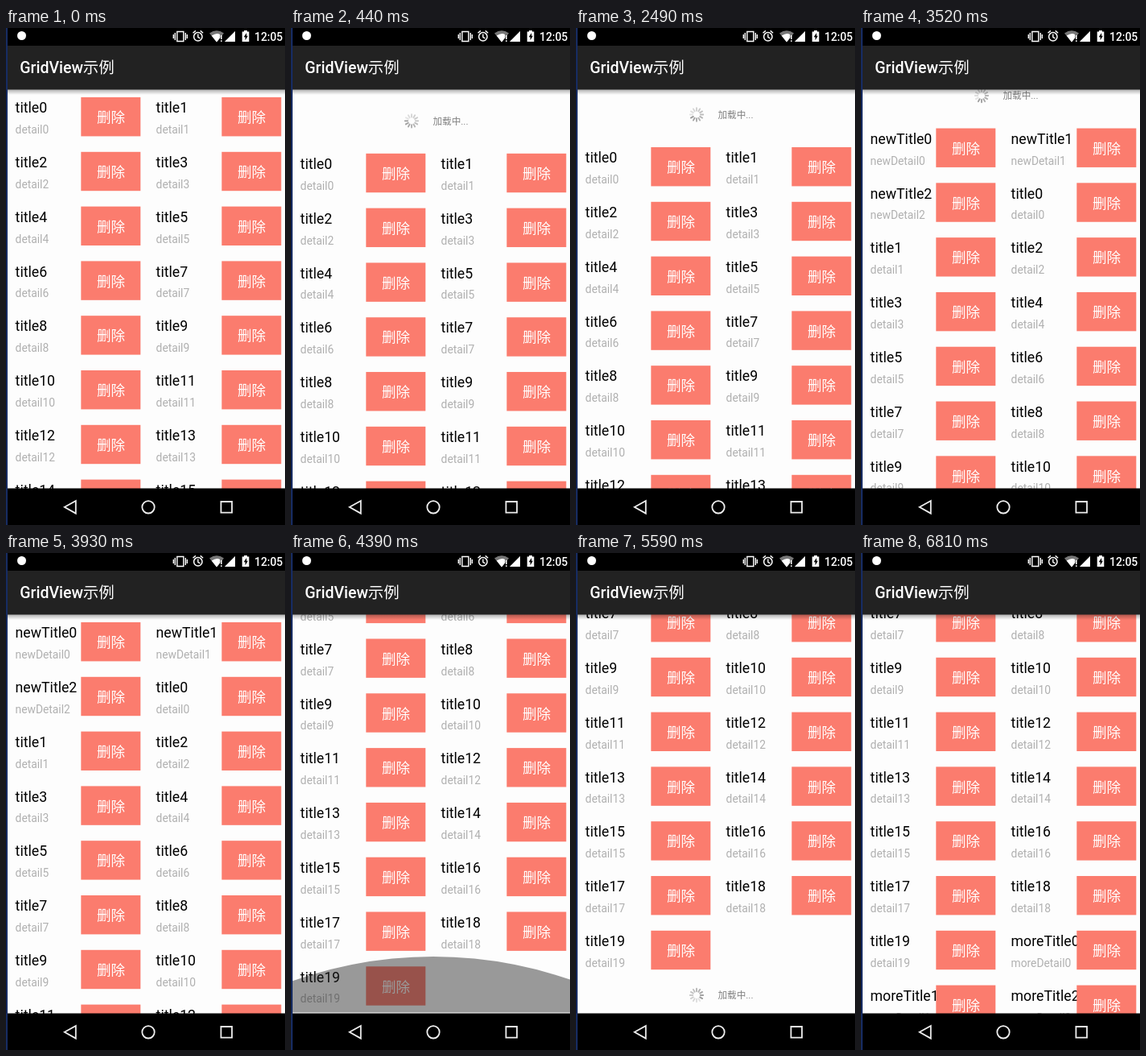
Write an HTML page with a canvas that moves like this. It is 347 px wide and 617 px high and loops after 7.2 s.

```html
<!DOCTYPE html>
<html lang="zh-CN">
<head>
<meta charset="utf-8">
<title>GridView</title>
<style>
html, body { margin: 0; width: 100%; height: 100%; overflow: hidden; background: #000; }
canvas { display: block; }
</style>
</head>
<body>
<canvas id="stage" width="347" height="617"></canvas>
<script>
const ctx = document.getElementById('stage').getContext('2d');
const LOOP = 7200, ROW = 67.8, COL = 175;
const RELEASED = 1420, REFRESHED = 3430, LOADED = 6600;
const FAMILY = 'Roboto, "Noto Sans CJK SC", "Noto Sans CJK", sans-serif';

const series = (n, name) => Array.from({ length: n }, (_, i) => name + i);
const base = series(20, 'title');
const fresh = [...series(3, 'newTitle'), ...base];
const full = [...fresh, ...series(3, 'moreTitle')];

const clamp = x => Math.min(1, Math.max(0, x));
const easeOut = x => 1 - (1 - x) ** 2;
const easeBoth = x => x * x * (3 - 2 * x);

// start, end, scroll position reached, easing
const moves = [
  [110, 700, -86.5, easeOut],
  [RELEASED, 1820, -62, easeOut],
  [REFRESHED, 3860, 0, easeOut],
  [4050, 4290, 318.5, easeBoth],
  [4560, 4860, 363, easeOut]
];

function scrollAt(t) {
  let pos = 0;
  for (const [start, end, to, ease] of moves)
    pos += (to - pos) * ease(clamp((t - start) / (end - start)));
  return pos;
}

function rect(x, y, w, h, color) {
  ctx.fillStyle = color;
  ctx.fillRect(x, y, w, h);
}

function text(str, x, y, size, color, weight = 400, align = 'left') {
  ctx.font = `${weight} ${size}px ${FAMILY}`;
  ctx.textAlign = align;
  ctx.fillStyle = color;
  ctx.fillText(str, x, y);
}

function shape(path, color, width) {
  const p = new Path2D(path);
  ctx.fillStyle = ctx.strokeStyle = color;
  ctx.lineWidth = width || 1;
  if (width) ctx.stroke(p); else ctx.fill(p);
}

function circle(x, y, r, color, width) {
  ctx.beginPath();
  ctx.arc(x, y, r, 0, 7);
  ctx.fillStyle = ctx.strokeStyle = color;
  ctx.lineWidth = width || 1;
  if (width) ctx.stroke(); else ctx.fill();
}

function loader(y, t) {
  const step = Math.floor(Math.max(0, t - RELEASED) / 95);
  ctx.lineWidth = 1.9;
  ctx.lineCap = 'round';
  for (let i = 0; i < 12; i++) {
    const a = (i + step + 7) * Math.PI / 6;
    const c = Math.cos(a), s = Math.sin(a);
    ctx.strokeStyle = `rgba(110,110,110,${0.18 + 0.045 * i})`;
    ctx.beginPath();
    ctx.moveTo(150 + c * 4.8, y + s * 4.8);
    ctx.lineTo(150 + c * 8.2, y + s * 8.2);
    ctx.stroke();
  }
  ctx.lineCap = 'butt';
  text('加载中...', 176.5, y + 4.4, 11.6, '#808080');
}

function cell(title, i, scroll) {
  const x = 2 + (i % 2) * COL;
  const y = Math.floor(i / 2) * ROW - scroll;
  if (y < -70 || y > 500) return;
  const detail = title.replace('title', 'detail').replace('Title', 'Detail');
  text(title, x + 9.6, y + 105.2, 17.7, '#000');
  text(detail, x + 9.6, y + 131, 13.8, '#b0b0b0');
  rect(x + 91.3, y + 86, 74, 48.4, '#fb7c6e');
  text('删除', x + 128.4, y + 117.2, 17.5, '#fff', 400, 'center');
}

function glow(t) {
  const grow = easeOut(clamp((t - 4260) / 130));
  const fade = easeOut(clamp((t - 4420) / 480));
  const size = grow * (1 - fade);
  if (size <= 0) return;
  ctx.save();
  ctx.beginPath();
  ctx.rect(2, 480, 345, 90.5);
  ctx.clip();
  ctx.translate(177, 571);
  ctx.scale(1, size);
  circle(0, 450, 520, `rgba(33,33,33,${0.45 * size})`);
  ctx.restore();
}

function statusBar() {
  const w = '#fff', dim = '#777';
  rect(2, 0, 345, 22, '#000');
  circle(19.5, 9.5, 5.5, w);
  shape('M212.8 4.5h8v12h-8zM210.3 6v9M223.3 6v9M208.3 8v5M225.3 8v5', w, 1.4);
  circle(238.8, 10.8, 5.2, w, 1.5);
  shape('M238.8 7.5v3.8l2.6 1.6M232.5 6.3l3.4-2.9M245.1 6.3l-3.4-2.9', w, 1.4);
  shape('M253 6.5Q262 0 271 6.5L262 17.5z', dim);
  shape('M255.7 9.6Q262 5.5 266 8V12.6L262 17.5z', w);
  shape('M267.8 9v5M267.8 15.3v1.8', w, 1.5);
  shape('M285 4V17H272z', dim);
  shape('M285 4V17H272L279 10z', w);
  shape('M293.7 4.5h2.4V3h3.8v1.5h2.4V17h-8.6z', w);
  shape('M299.2 6l-3.5 5.2h1.9v4l3.3-5.4h-1.7z', '#000');
  text('12:05', 309, 16, 13.9, w, 500);
}

function navBar() {
  rect(2, 571.5, 345, 46, '#000');
  shape('M72.8 594.8L86.8 587V602.6z', '#eee', 1.8);
  circle(177, 594.8, 7.7, '#eee', 1.8);
  shape('M267.4 588h13.6v13.6h-13.6z', '#eee', 1.8);
}

function appBar() {
  const shadow = ctx.createLinearGradient(0, 76, 0, 83);
  shadow.addColorStop(0, 'rgba(0,0,0,.32)');
  shadow.addColorStop(1, 'rgba(0,0,0,0)');
  rect(2, 76, 345, 7, shadow);
  rect(2, 22, 345, 54.5, '#222');
  text('GridView', 17.3, 56, 19.5, '#fff', 500);
  text('示例', 95.8, 56, 19.5, '#fff');
}

function draw(t) {
  const scroll = scrollAt(t);
  const items = t < REFRESHED ? base : t < LOADED ? fresh : full;
  rect(0, 0, 347, 617, '#fdfdfd');
  if (scroll < 0) loader(45.5 - scroll, t);
  items.forEach((title, i) => cell(title, i, scroll));
  if (scroll > 318.5 && t < LOADED) loader(912 - scroll, t);
  glow(t);
  appBar();
  statusBar();
  navBar();
  rect(0, 0, 2, 617, '#172c63');
}

function tick(now) {
  draw(now % LOOP);
  requestAnimationFrame(tick);
}
requestAnimationFrame(tick);
</script>
</body>
</html>
```
